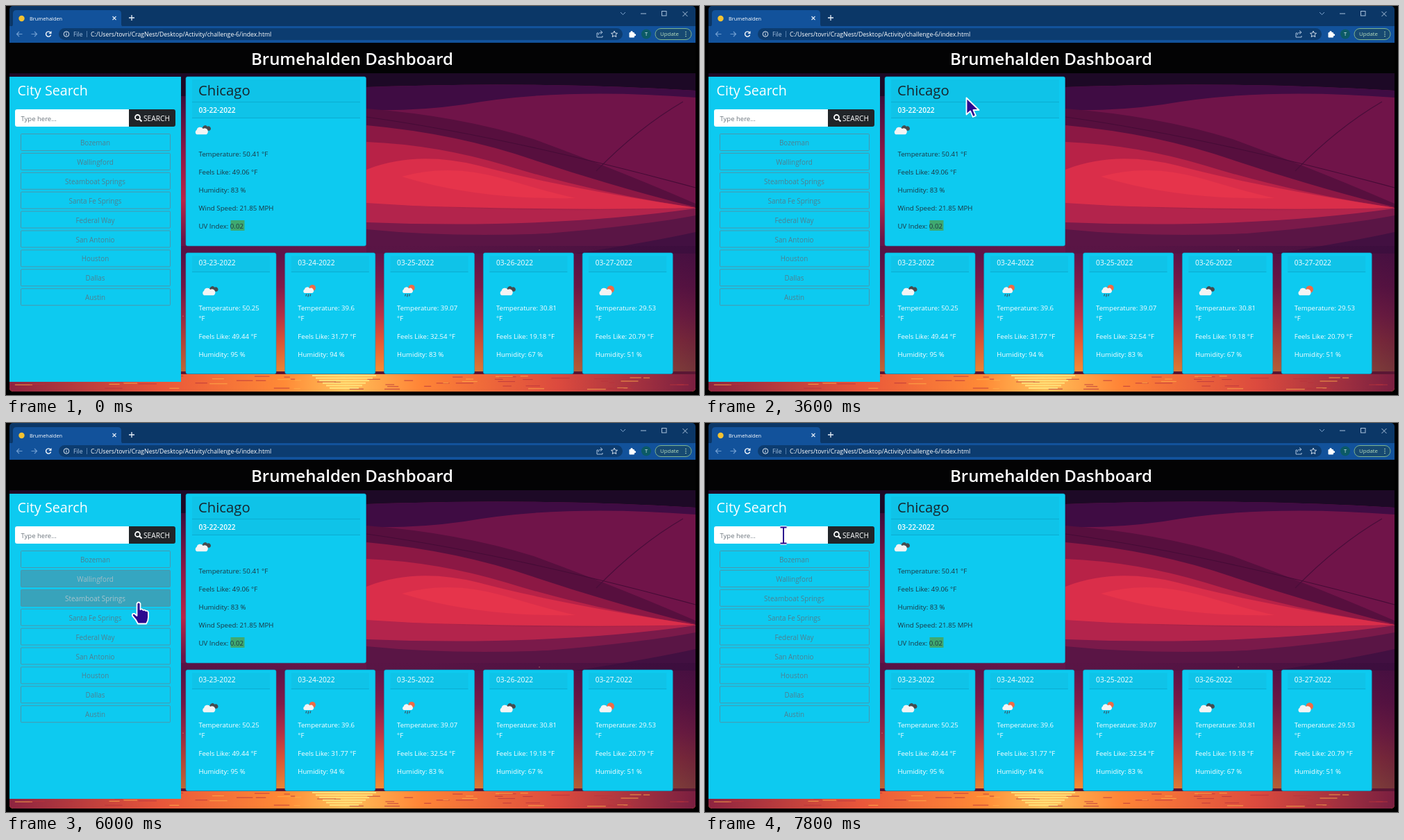
Write an HTML page that moves like this. It is 998 px wide and 561 px high and loops after 8 s.

```html
<!DOCTYPE html>
<html lang="en">
<head>
<meta charset="utf-8">
<title>Brumehalden</title>
<style>
html, body { margin: 0; width: 100%; height: 100%; overflow: hidden; background: #000; }
svg { display: block; width: 100%; height: 100%; font-family: "Open Sans", "Noto Sans", sans-serif; }
text { white-space: pre; }
</style>
</head>
<body>
<svg id="stage" viewBox="0 0 998 561"></svg>
<script>
const stage = document.getElementById('stage');
const LOOP = 8000, STEP = 200;
const CYAN = '#0dcaf0', INK = '#1d3440', GRAY = '#4f7f90';

const rect = (x, y, w, h, fill, more = '') =>
  `<rect x="${x}" y="${y}" width="${w}" height="${h}" fill="${fill}" ${more}/>`;
const text = (x, y, size, fill, str, more = '') =>
  `<text x="${x}" y="${y}" font-size="${size}" fill="${fill}" ${more}>${str}</text>`;
const path = (d, fill, more = '') => `<path d="${d}" fill="${fill}" ${more}/>`;
const line = (d, color, w = 1, more = '') =>
  path(d, 'none', `stroke="${color}" stroke-width="${w}" ${more}`);
const circle = (x, y, r, fill, more = '') =>
  `<circle cx="${x}" cy="${y}" r="${r}" fill="${fill}" ${more}/>`;
const at = (x, y, body) => `<g transform="translate(${x} ${y})">${body}</g>`;
const grad = (id, stops, dir = 'x2="0" y2="1"') =>
  `<linearGradient id="${id}" ${dir}>` +
  stops.map(([o, c, a = 1]) => `<stop offset="${o}" stop-color="${c}" stop-opacity="${a}"/>`).join('') +
  '</linearGradient>';

let seed = 7;
const rnd = () => (seed = seed * 16807 % 2147483647) / 2147483647;

function scenery() {
  let s = rect(5, 97, 988, 459, 'url(#sky)');
  s += path('M252 97H993V126Q760 110 519 118L252 130Z', '#1d0926');
  s += path('M519 117Q760 108 993 122V290H519Z', '#701449');
  s += path('M519 117Q760 108 993 122V132Q800 117 660 142Q590 152 519 150Z', '#3f0c43');
  s += path('M519 148Q650 158 760 192Q880 236 993 285V291L519 222Z', '#570f3e');
  s += path('M519 172Q650 184 760 222Q880 262 993 290L519 262Z', '#8c1844');
  s += path('M519 196Q620 200 720 230Q850 270 993 291L519 290Z', '#b82247');
  s += path('M519 236Q590 208 680 230Q800 262 993 291Q800 296 519 286Z', '#da2e4a');
  s += path('M570 246Q640 226 720 250Q780 268 820 277Q680 280 570 246Z', '#e6344b');
  s += path('M519 284Q760 300 993 291Q880 318 700 322L519 318Z', '#b3244c');
  s += path('M519 312Q780 322 993 292V357H519Z', '#7a1a4a');
  s += path('M519 322Q640 334 780 328Q920 316 993 302V357H519Z', '#5a1545');
  s += path('M820 357Q930 340 993 326V357Z', '#421041');
  s += line('M975 138Q910 176 850 238', '#4a0d3a', 1.4);
  s += line('M519 160Q720 188 993 262', '#450b36', 1.2);
  for (let i = 0; i < 14; i++)
    s += circle(255 + rnd() * 735, 346 + rnd() * 110, .7, '#ff9a86');
  s += rect(5, 346, 988, 181, 'url(#dusk)');
  s += rect(5, 527, 988, 5, '#5a1734') + rect(5, 531, 988, 25, 'url(#sea)');
  for (let i = 0; i < 70; i++) {
    const x = 10 + rnd() * 960, w = 5 + rnd() * 22;
    s += rect(x, 533 + rnd() * 20, w, 1.2, i % 3 ? '#b8323c' : '#ffb04a', 'opacity=".7"');
  }
  for (let i = 0; i < 6; i++)
    s += rect(441 + i * 5, 532 + i * 3.6, 92 - i * 10, 2, '#ffe27a');
  return s;
}

function browser() {
  const W = '#e6eef8', D = '#7fa5cf';
  let s = rect(5, 0, 988, 32, '#0b3767') + rect(5, 29, 988, 24, '#12529b');
  s += path('M6 30Q10 30 10 26V11Q10 6 15 6H161Q166 6 166 11V26Q166 30 170 30Z', '#12529b');
  s += circle(22.5, 18, 4.2, '#f3c232');
  s += text(34, 20.5, 7.4, '#fff', 'Brumehalden');
  s += line('M153.5 15l5 5m0-5l-5 5', W, 1.1) + line('M181 13v8m-4-4h8', W, 1.3);
  s += line('M885 9l3.5 3.5l3.5-3.5', D) + line('M914 11h8', '#a9c1dc');
  s += rect(944.5, 7.5, 6.5, 6.5, 'none', 'stroke="#a9c1dc"');
  s += line('M974.5 8l7 7m0-7l-7 7', '#a9c1dc');
  s += line('M23.5 40.5h-8m3.5-3.5l-3.5 3.5l3.5 3.5', '#6f9dd0', 1.2);
  s += line('M36.5 40.5h8m-3.5-3.5l3.5 3.5l-3.5 3.5', '#6f9dd0', 1.2);
  s += line('M64 38.3A3.6 3.6 0 1 0 64.6 41.5', '#fff', 1.4) + path('M65.5 36v4h-4z', '#fff');
  s += rect(76, 32, 812, 17, '#0c3c70', 'rx="8.5"');
  s += circle(87, 40.5, 3.8, 'none', `stroke="${W}"`) + line('M87 40v2.5m0-4.2v1', W);
  s += text(97, 43.7, 8.6, '#a9c4e2', 'File') + line('M116.5 36v9', '#527fae');
  s += text(122, 43.7, 8.7, '#fff', 'C:/Users/tovri/CragNest/Desktop/Activity/challenge-6/index.html');
  s += line('M853 39h-2v6h8v-2m-6-1q0-4 5-4m-2-2.5l3 2.5l-3 2.5', '#a9c1dc');
  s += path('M876 36l1.3 3l3.2.3l-2.4 2.1l.7 3.2l-2.8-1.7l-2.8 1.7l.7-3.2l-2.4-2.1l3.2-.3z',
    'none', `stroke="${W}" stroke-width=".9"`);
  s += rect(897.5, 38, 7.5, 7.5, '#fff', 'rx="1"') + circle(901, 37.7, 1.7, '#fff') + circle(905.5, 41.7, 1.6, '#fff');
  s += circle(922, 40.5, 7, '#0b5a66') + text(922, 43.3, 7.5, '#e6f4f4', 'T', 'text-anchor="middle"');
  s += rect(935, 32.5, 52, 16, '#174a72', 'rx="8" stroke="#7fb48e"');
  s += text(942, 43.3, 7.9, '#b9dfbd', 'Update');
  for (const y of [37.5, 40.5, 43.5]) s += circle(979, y, .8, '#b9dfbd');
  s += rect(5, 53, 988, 44, '#030304');
  s += text(498.5, 84.5, 24, '#fff', 'Brumehalden Dashboard', 'font-weight="600" text-anchor="middle"');
  return s;
}

// Weather symbols, drawn around their centre
const puff = fill => path('M-8 6A4 4 0 0 1-8-1A5.5 5.5 0 0 1 2-3A4.5 4.5 0 0 1 7 6Z', fill);
const scaled = (x, y, k, body) => `<g transform="translate(${x} ${y}) scale(${k})">${body}</g>`;
const front = scaled(-1.5, 1.2, .92, puff('#f4f4f4'));
const icons = {
  clouds: scaled(5, -2.8, .66, puff('#454b4f')) + front,
  sun: circle(5.5, -2, 5.3, '#ee6b45') + front,
  rain: circle(4.5, -4, 4.6, '#ee6b45') + scaled(-1, -1, .75, puff('#f4f4f4')) +
    line('M-4 5l-1 3m4-3l-1 4m4-4l-1 3', '#3c5263', 1.2)
};

const days = [
  ['03-23-2022', 'clouds', '50.25', '49.44', 95],
  ['03-24-2022', 'rain', '39.6', '31.77', 94],
  ['03-25-2022', 'rain', '39.07', '32.54', 83],
  ['03-26-2022', 'clouds', '30.81', '19.18', 67],
  ['03-27-2022', 'sun', '29.53', '20.79', 51]
];

function cards() {
  const edge = 'rx="2.5" stroke="#0b9fc4" stroke-width=".6"';
  const band = '#0fc3e8', rule = '#0bacd0';
  let s = rect(259, 102, 259.5, 244, CYAN, edge);
  s += rect(268, 106, 242, 56, band) + rect(268, 138, 242, 1, rule) + rect(268, 161, 242, 1, rule);
  s += text(277, 128.5, 20.3, '#17252c', 'Chicago', 'font-weight="500"');
  s += text(277.5, 154, 10.2, '#fff', '03-22-2022', 'font-weight="600"');
  s += at(283.5, 178.5, icons.clouds);
  s += rect(323.5, 309, 20, 15, '#3fa970');
  ['Temperature: 50.41 °F', 'Feels Like: 49.06 °F', 'Humidity: 83 %', 'Wind Speed: 21.85 MPH', 'UV Index: 0.02']
    .forEach((str, i) => s += text(277.5, 216.5 + 26 * i, 9.7, INK, str));
  days.forEach(([date, icon, temp, feel, hum], i) => {
    let c = rect(0, 356, 130, 174.5, CYAN, edge);
    c += rect(9, 360.5, 112, 23, band) + rect(9, 383, 112, 1, rule);
    c += text(18.5, 374, 10.2, '#fff', date, 'font-weight="500"') + at(35, 410.5, icons[icon]);
    [[438.5, 'Temperature: ' + temp], [454, '°F'], [480, `Feels Like: ${feel} °F`], [506, `Humidity: ${hum} %`]]
      .forEach(([y, str]) => c += text(18.5, y, 9.6, '#fff', str, 'font-weight="500"'));
    s += at(259 + 142.8 * i, 0, c);
  });
  return s;
}

const cities = ['Bozeman', 'Wallingford', 'Steamboat Springs', 'Santa Fe Springs', 'Federal Way',
  'San Antonio', 'Houston', 'Dallas', 'Austin'];
const ROW = 27.9, TOP = 184;

function sidebar() {
  let s = rect(5, 102, 247, 440, CYAN);
  s += text(16.5, 128.5, 19.7, '#fff', 'City Search');
  s += path('M177 149H16Q13 149 13 152V171Q13 174 16 174H177Z', '#fff');
  s += text(21.5, 165.5, 9.5, '#6c757d', 'Type here...');
  s += path('M177 149H241Q244 149 244 152V171Q244 174 241 174H177Z', '#212529');
  s += circle(189.5, 160.5, 3.5, 'none', 'stroke="#fff" stroke-width="1.8"') + line('M192 163l3.5 3.5', '#fff', 2.2);
  s += text(198, 165.7, 10.2, '#fff', 'SEARCH');
  cities.forEach((name, i) => {
    const y = TOP + ROW * i;
    s += rect(21.5, y + .5, 215, 24, '#6c757d',
      'class="hover" rx="1" fill-opacity="0" stroke="#5a8b9c" stroke-width=".8"');
    s += text(128.5, y + 17, 9.9, GRAY, name, 'class="city" text-anchor="middle"');
  });
  return s;
}

const skin = 'stroke="#fff" stroke-width="1.8" stroke-linejoin="round"', VIOLET = '#2b0a8f';
const beam = 'M-4.5-11.5H4.5M-4.5 11.5H4.5M0-11.5V11.5';
const shapes = {
  arrow: path('M.5.5V24.5L6.2 19.5L9.8 28L14 26.2L10.4 18H18.5Z', VIOLET, skin),
  hand: path('M-2.5 2.5Q0-1.5 2.5 2.5V11Q5 9.5 6.5 12Q9 10.8 10.3 13Q13.5 12 14 15.5V22' +
    'Q14 27 11 31.5H-1Q-4 25-9 20Q-10 16.5-6 17L-2.5 20Z', VIOLET, skin),
  beam: line(beam, '#fff', 4.5) + line(beam, VIOLET, 2)
};

stage.innerHTML = '<defs>' +
  grad('sky', [[0, '#1d0926'], [.1, '#4a0f3e'], [.25, '#8c1846'], [.4, '#b82648'], [.52, '#6b1748'],
    [.57, '#64154a'], [.67, '#8a1c49'], [.76, '#c03446'], [.84, '#ea5a34'], [.95, '#ff9a33']]) +
  grad('dusk', [[0, '#3a0d3c', .5], [.28, '#3a0d3c', .3], [.45, '#3a0d3c', 0], [.6, '#3a0d3c', .05],
    [.84, '#3a0d3c', .4], [1, '#3a0d3c', .7]], '') +
  grad('sea', [[0, '#8e2440'], [.22, '#e9563a'], [.4, '#ff8a36'], [.49, '#ffc05a'], [.6, '#ff8436'],
    [.8, '#dc4a3e'], [1, '#7a1f40']], '') +
  '<clipPath id="win"><rect x="5" y="0" width="988" height="556" rx="5"/></clipPath></defs>' +
  rect(0, 0, 998, 561, '#000') +
  `<g clip-path="url(#win)">${scenery()}${browser()}${cards()}${sidebar()}</g>` +
  '<g id="ring" fill="none"><circle stroke="#3a3a3a" stroke-opacity=".65" stroke-width="3.4"/>' +
  '<circle id="glow" stroke="#fff" stroke-width="1.7"/></g>' +
  `<g id="pointer">${Object.entries(shapes).map(([k, v]) => `<g id="${k}">${v}</g>`).join('')}</g>`;

const $ = id => document.getElementById(id);
const hovers = [...document.querySelectorAll('.hover')];
const labels = [...document.querySelectorAll('.city')];

// Pointer route: time, x, y
const route = [
  [1400, 902, 205], [2400, 672, 90], [2600, 666, 86], [3000, 666, 86], [3600, 376, 132], [5000, 376, 132],
  [5600, 215, 215], [5980, 192, 238], [6000, 191, 258], [6800, 186, 370], [7000, 186, 474],
  [7200, 185, 424], [7600, 116, 165], [7800, 113, 162]
];

function place(t) {
  if (t <= route[0][0]) return route[0].slice(1);
  const i = route.findIndex(k => k[0] >= t);
  if (i < 0) return route[route.length - 1].slice(1);
  const [a, x, y] = route[i - 1], [b, u, v] = route[i], f = (t - a) / (b - a);
  return [x + (u - x) * f, y + (v - y) * f];
}

function rowAt(t) {
  const [x, y] = place(t), i = Math.floor((y - TOP + 1.5) / ROW);
  return x > 21 && x < 237 && i >= 0 && i < cities.length ? i : -1;
}

// A row lights at once and fades over 150 ms after the pointer leaves.
function glowOf(row, t) {
  if (rowAt(t) === row) return 1;
  let n = 0;
  for (let d = 5; d <= 150; d += 5) if (rowAt(t - d) === row) n++;
  return n / 30;
}

function mix(a, b, f) {
  const part = (c, i) => parseInt(c.slice(1 + 2 * i, 3 + 2 * i), 16);
  return `rgb(${[0, 1, 2].map(i => Math.round(part(a, i) + (part(b, i) - part(a, i)) * f))})`;
}

function draw(now) {
  const t = Math.floor(now % LOOP / STEP) * STEP;
  const [x, y] = place(t), row = rowAt(t);
  const inBox = x > 13 && x < 177 && y > 149 && y < 174;
  const kind = inBox ? 'beam' : row >= 0 ? 'hand' : 'arrow';
  for (const k in shapes) $(k).setAttribute('display', k === kind ? 'inline' : 'none');
  $('pointer').setAttribute('display', t >= 1400 ? 'inline' : 'none');
  $('pointer').setAttribute('transform', `translate(${x} ${y})`);

  hovers.forEach((el, i) => {
    const g = glowOf(i, t);
    el.setAttribute('fill-opacity', .46 * g);
    labels[i].setAttribute('fill', mix(GRAY, '#a9c3cc', g));
  });

  // The locator ring closes in on the pointer.
  const age = [2600, 4400].map(s => t - s).find(d => d >= 0 && d < 500);
  const r = age === undefined ? 0 : 51 - age / 10;
  $('ring').setAttribute('display', r ? 'inline' : 'none');
  $('ring').setAttribute('transform', `translate(${x} ${y - 2})`);
  for (const c of $('ring').children) c.setAttribute('r', r);
  $('glow').setAttribute('stroke-dasharray', r < 45 ? '2.5 1' : 'none');
}

function tick(now) {
  draw(now);
  requestAnimationFrame(tick);
}
draw(0);
requestAnimationFrame(tick);
</script>
</body>
</html>
```
